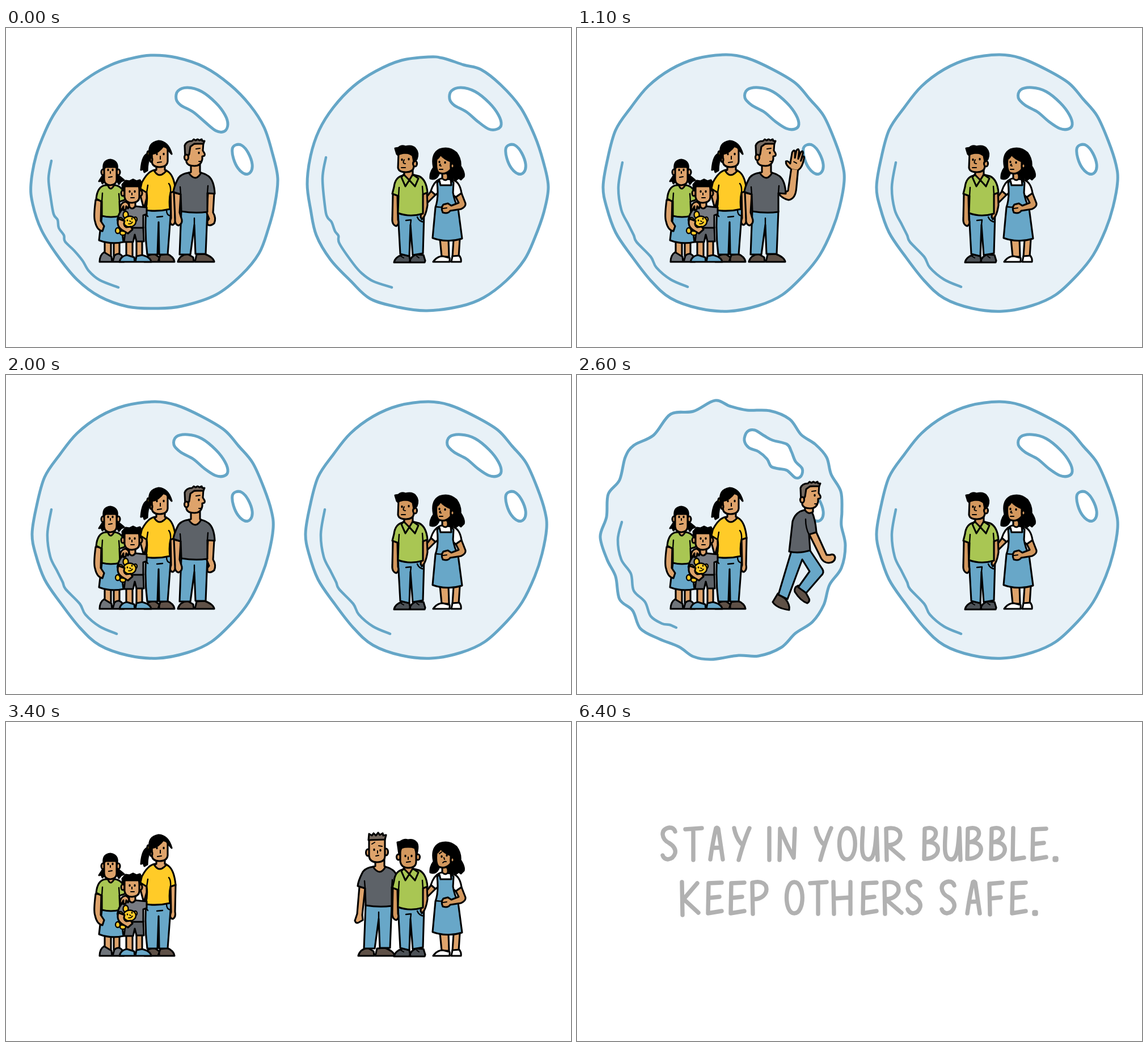
An HTML page for the animation above (6.9 s loop, 996x562 px).

```html
<!DOCTYPE html>
<html lang="en">
<head>
<meta charset="utf-8">
<title>Stay in your bubble</title>
<style>
html, body { margin: 0; width: 100%; height: 100%; overflow: hidden; background: #fff; }
svg { display: block; width: 100%; height: 100%; }
text { font: 62px "Open Sans", sans-serif; fill: transparent; }
</style>
</head>
<body>
<svg id="stage" viewBox="0 0 996 562"></svg>
<script>
const NS = 'http://www.w3.org/2000/svg';
const stage = document.getElementById('stage');

function add(parent, tag, attrs) {
  const e = document.createElementNS(NS, tag);
  for (const k in attrs) e.setAttribute(k, attrs[k]);
  parent.appendChild(e);
  return e;
}
const group = (parent, attrs) => add(parent, 'g', attrs || {});
const show = (e, on) => e.setAttribute('display', on ? 'inline' : 'none');
const shape = (g, fill, d) => add(g, 'path', { d, fill });
const line = (g, d, w) => add(g, 'path', { d, fill: 'none', 'stroke-width': w || 2.4 });
const dots = (g, list, r) => list.forEach(([cx, cy]) =>
  add(g, 'ellipse', { cx, cy, rx: r || 1.7, ry: (r || 1.7) * 1.35, fill: INK, stroke: 'none' }));
const oval = (g, fill, cx, cy, rx, ry) => add(g, 'ellipse', { cx, cy, rx, ry, fill });

const INK = '#000', SKIN = '#dea36b', TAN = '#d3985e', GREEN = '#a9c653', BLUE = '#68a7c8',
  YELLOW = '#ffcb28', GREY = '#5d6268', BROWN = '#5f5147', RIM = '#65a6c7', FILM = '#e8f1f7';

// Smooth curve through a few points
function curve(text, closed) {
  const n = text.trim().split(/\s+/).map(p => p.split(',').map(Number)), len = n.length;
  const at = i => closed ? n[(i + len) % len] : n[Math.max(0, Math.min(len - 1, i))];
  let d = 'M' + n[0];
  for (let i = 0; i < (closed ? len : len - 1); i++) {
    const [a, b, c, e] = [at(i - 1), at(i), at(i + 1), at(i + 2)];
    d += `C${b[0] + (c[0] - a[0]) / 6} ${b[1] + (c[1] - a[1]) / 6} ` +
      `${c[0] - (e[0] - b[0]) / 6} ${c[1] - (e[1] - b[1]) / 6} ${c[0]} ${c[1]}`;
  }
  return d + (closed ? 'Z' : '');
}

const GLARE = '300,125 303,111 320,105 345,112 370,132 386,153 391,170 385,182 370,181 350,165 330,148 308,136';
const GLINT = '399,213 405,206 416,207 427,220 434,240 431,254 421,257 409,247 401,230';
const FILMS = [
  { rim: '255,48 300,52 350,69 395,100 430,136 455,175 470,222 479,265 474,310 462,355 446,397 415,435 370,470 310,490 265,494 215,491 165,473 125,443 90,400 62,355 47,310 44,275 53,225 70,180 87,148 115,112 150,84 185,65 215,55',
    glare: GLARE, glint: GLINT,
    shine: '80,234 75,265 79,300 84,328 91,338 93,352 102,365 104,376 120,392 135,410 146,428 165,444 198,457' },
  { rim: '262,51 288,53 325,65 355,73 390,100 425,140 450,190 465,235 474,280 466,325 450,370 432,408 400,445 360,475 320,490 260,498 210,492 160,477 125,445 90,408 65,365 55,320 49,275 55,225 70,180 95,140 130,103 170,76 215,57',
    glare: GLARE.replace('385,182 370,181', '384,178 369,178'), glint: GLINT,
    shine: '82,228 76,265 81,320 85,334 92,342 98,358 104,366 106,380 130,415 145,432 165,446 198,457' },
  { rim: '262,47 300,53 345,73 385,97 410,125 435,155 455,200 468,240 471,270 463,315 450,355 428,400 400,435 362,470 320,489 268,499 215,494 165,476 130,445 95,400 68,360 52,315 46,280 53,235 68,180 95,140 125,103 165,73 210,54',
    glare: GLARE.replace('300,125 303,111', '296,123 300,109').replace('385,182 370,181', '384,178 369,177'), glint: GLINT,
    shine: '80,237 73,280 78,320 90,345 100,365 105,377 130,403 140,422 165,443 195,456' },
  { rim: '243,45 270,55 300,62 340,63 375,78 395,105 420,122 440,145 448,175 465,205 467,240 466,265 473,300 466,340 445,370 435,405 415,435 385,455 360,480 320,495 285,494 237,501 205,496 180,479 145,465 112,447 98,415 75,395 68,355 53,325 41,285 52,250 55,210 75,185 85,145 100,124 135,106 165,69 205,64',
    glare: '295,115 300,100 313,97 330,107 345,115 370,122 378,135 385,152 397,165 395,178 385,181 370,168 355,165 342,161 335,148 320,135 303,128',
    glint: GLINT,
    shine: '79,259 72,290 78,325 95,350 100,380 120,400 130,425 150,438 163,440 175,445' }
];

function makeBubble(x) {
  const g = group(stage, { transform: `translate(${x})`, stroke: RIM, 'stroke-width': 5,
    'stroke-linecap': 'round', 'stroke-linejoin': 'round' });
  const films = FILMS.map(f => {
    const b = group(g);
    shape(b, FILM, curve(f.rim, true));
    shape(b, '#fff', curve(f.glare, true));
    shape(b, '#fff', curve(f.glint, true));
    line(b, curve(f.shine), 4.5);
    return b;
  });
  const spray = [0, 1].map(s => {
    let d = '';
    for (let i = 0; i < 22; i++) {
      const a = i / 22 * 2 * Math.PI + .1 * Math.sin(i * 7);
      const r = 232 + 16 * s + 10 * Math.sin(i * 5), q = r + 20 - 6 * s;
      const c = Math.cos(a), v = Math.sin(a);
      d += `M${259 + r * c} ${276 + r * v}L${259 + q * c} ${276 + q * v}`;
    }
    return line(g, d, 4.5);
  });
  // film: 0-3 whole, 4-5 burst, -1 gone
  return film => [...films, ...spray].forEach((e, i) => show(e, i === film));
}

const bubbles = [makeBubble(0), makeBubble(482)];
const cast = group(stage, { stroke: INK, 'stroke-width': 3.1, 'stroke-linejoin': 'round', 'stroke-linecap': 'round' });

function girl(g) {
  shape(g, SKIN, 'M174 376V402H185V376ZM190 376V402H200V376Z');
  shape(g, '#70757b', 'M165 412Q165 400 173 395L186 403L187 412ZM188 412L191 401Q200 393 207 405L208 412Z');
  shape(g, BLUE, 'M169 331L164 374Q185 382 207 377L201 331Z');
  shape(g, SKIN, 'M158 303Q154 333 157 341Q160 356 170 358L173 349L167 340L168 303Z');
  shape(g, GREEN, 'M175 277Q161 279 159 301L169 306V331Q185 335 201 331L200 306L212 302Q208 280 193 277Z');
  line(g, 'M169 306L170 291M200 306L199 292');
  shape(g, SKIN, 'M180 272V278Q184 288 190 278V272');
  shape(g, INK, 'M171 259L164 270L168 269L170 274L176 267ZM197 259L208 268L203 270L199 275L195 267Z');
  oval(g, SKIN, 171, 254, 3, 5);
  oval(g, SKIN, 198, 254, 3, 5);
  shape(g, SKIN, 'M173 245V267Q174 277 184 277Q195 276 195 267V245Z');
  shape(g, INK, 'M172 249Q170 233 184 232Q198 234 196 249L193 243L187 244L184 242L176 244Z');
  dots(g, [[180, 250], [188, 250]]);
  line(g, 'M181 263L187 262M184 253V256', 2);
}

function boy(g) {
  shape(g, SKIN, 'M212 375V403H223V375ZM230 375V403H240V375Z');
  shape(g, BLUE, 'M200 412Q202 402 213 400L226 404L227 412ZM228 412L230 402L240 400Q255 404 256 412Z');
  shape(g, GREY, 'M211 351L208 377H224L227 364L230 376H243L242 351Z');
  shape(g, '#777b82', 'M214 315Q201 318 197 335L210 340L211 352H242V330L248 328V316Q236 315 228 314Z');
  shape(g, SKIN, 'M217 305V314Q222 322 228 314V305');
  oval(g, SKIN, 206, 291, 3, 5);
  oval(g, SKIN, 237, 291, 3, 5);
  shape(g, SKIN, 'M209 279V298Q211 308 222 308Q235 307 235 298V279Z');
  shape(g, INK, 'M206 286L205 276L211 269L218 270L224 267L230 270L236 268L239 274L236 287L234 278H210Z');
  dots(g, [[218, 288], [227, 288]]);
  line(g, 'M220 299H226M222 291V294', 2);
}

function bear(g) {
  const b = group(g, { 'stroke-width': 2.3 });
  oval(b, YELLOW, 201, 338, 5, 4);
  oval(b, YELLOW, 197, 357, 4, 5);
  oval(b, YELLOW, 206, 361, 5, 4);
  oval(b, YELLOW, 207, 348, 9, 10);
  oval(b, YELLOW, 211, 329, 4.5, 6);
  oval(b, YELLOW, 228, 337, 3, 4);
  oval(b, YELLOW, 218, 341, 11, 9.5);
  dots(b, [[214, 339], [222, 336]], 1.3);
  line(b, 'M216 345Q220 346 223 342M218 340L220 341', 1.8);
  shape(g, SKIN, 'M198 336Q194 349 205 356L215 362L223 355L220 350L212 351Q206 348 209 340Z');
}

function mother(g) {
  shape(g, SKIN, 'M240 275L236 292L243 318L248 300V288Z');
  shape(g, BROWN, 'M244 412Q246 399 262 398L270 404V412ZM268 412L272 400L284 398Q296 403 297 412Z');
  shape(g, BLUE, 'M247 319Q244 360 249 399H267L269 342L270 399H285L291 319Z');
  line(g, 'M266 333L276 332M250 332L247 328M283 321Q283 330 290 331');
  shape(g, SKIN, 'M290 286L291 335Q287 346 294 347Q300 344 298 334L299 287Z');
  shape(g, YELLOW, 'M262 250Q247 253 235 282L248 290Q250 305 246 321Q268 324 289 319Q287 302 290 290L299 287Q296 256 282 251Z');
  line(g, 'M248 290L250 277M290 290Q291 279 287 274');
  shape(g, SKIN, 'M265 243V250Q262 252 261 251Q270 267 283 251L280 250V243');
  shape(g, INK, 'M251 221Q240 223 238 250L242 248L244 254L249 251Q249 237 254 226Z');
  oval(g, YELLOW, 251, 221, 2, 4);
  shape(g, SKIN, 'M257 218V235Q258 245 270 245Q284 245 285 235V211L270 206Z');
  oval(g, SKIN, 256, 232, 2, 4);
  shape(g, INK, 'M253 223Q250 202 269 199Q286 200 292 222L286 215Q282 208 278 207Q268 221 257 222V228Z');
  dots(g, [[266, 222], [278, 222]]);
  line(g, 'M267 237L274 236M272 226V231', 2);
}

function motherHand(g) {
  shape(g, SKIN, 'M211 306Q202 307 201 318L204 320L207 314V321L211 320L212 314L215 318Q220 311 211 306Z');
}

const HEAD = g => {
  shape(g, SKIN, 'M318 206V236Q320 243 332 243Q344 243 346 231V226Q352 226 350 221L347 216L348 202Z');
  shape(g, '#75695f', 'M316 231L315 207Q318 199 328 199L331 196L334 198L338 196L341 198L345 196L346 199L350 199L348 204L332 204L325 209L323 222L319 230Z');
  oval(g, SKIN, 318, 228, 3.5, 5);
  dots(g, [[340, 220]]);
  line(g, 'M335 213L342 212M340 235H345', 2);
};
const TORSO = 'M322 255Q306 257 302 268Q296 280 295 289L308 293L309 323Q333 327 355 324V291L368 292Q367 269 357 261Q350 256 343 255Z';

function manLegs(g) {
  shape(g, BLUE, 'M309 322L306 399H325L332 347L334 398H352L355 322Z');
  line(g, 'M332 347V335');
}
function manShoes(g) {
  shape(g, BROWN, 'M303 412Q306 400 320 398L330 404L331 412ZM333 412L336 399L350 398Q366 404 367 412Z');
}
function manTorso(g) {
  shape(g, GREY, TORSO);
  line(g, 'M308 293L307 280M355 291L356 278');
  shape(g, SKIN, 'M326 240V254L322 255Q334 273 344 255L342 254V240');
}
const HAND = 'M371 248Q361 243 361 236Q364 234 369 239L370 219Q373 212 375 218L376 228L377 215Q380 209 382 216V229L385 217Q389 212 389 219L387 232L389 224Q393 222 392 228Q391 243 385 248';

function standingMan(g) {
  manShoes(g);
  manLegs(g);
  shape(g, SKIN, 'M296 290L298 335Q297 346 304 348Q311 345 310 338L306 325L308 293Z');
  const down = shape(g, SKIN, 'M367 291L365 325Q371 335 367 344Q360 350 355 346V340L358 336L354 326L356 291Z');
  const up = group(g);
  shape(up, SKIN, 'M356 283Q364 294 371 287L372 247L384 247L385 280Q386 300 374 303Q363 302 355 294Z');
  shape(up, SKIN, HAND);
  line(up, 'M375 235L380 237', 2);
  manTorso(g);
  HEAD(g);
  return { down, up };
}

function walkingMan(g) {
  const legs = [group(g), group(g)];
  shape(legs[0], BROWN, 'M354 385L345 400Q352 411 374 414Q376 405 367 394ZM390 371Q382 374 384 382Q394 398 406 402Q412 398 408 392L403 383Z');
  shape(legs[0], BLUE, 'M410 308L432 341Q437 348 430 354L404 384L390 374L410 346L397 325L371 395L355 387L378 310Z');
  shape(legs[1], BROWN, 'M346 358Q337 361 338 369L344 383L354 379L357 367ZM398 402L400 412H428Q428 405 413 400Z');
  shape(legs[1], BLUE, 'M410 308Q415 350 412 402H397L394 345L382 371L356 370L352 357L374 352L378 310Z');
  shape(g, SKIN, 'M407 276L428 318Q433 331 444 331Q455 330 455 321Q453 314 446 317L440 317L421 275Z');
  shape(g, GREY, 'M401 238Q385 241 380 258L374 311Q391 315 411 309L409 281L422 277Q420 253 414 241Z');
  line(g, 'M403 254Q403 270 409 281');
  shape(g, SKIN, 'M402 230V238Q408 247 416 241V232');
  HEAD(group(g, { transform: 'translate(79,-8)' }));
  return legs;
}

function visitor(g) {
  manShoes(group(g, { transform: 'translate(318)' }));
  const b = group(g, { transform: 'translate(325)' });
  manLegs(b);
  shape(b, SKIN, 'M298 290L294 338L290 350Q292 356 297 353L304 349L303 340L308 293Z');
  manTorso(b);
  oval(g, SKIN, 638, 230, 3.5, 6);
  oval(g, SKIN, 670, 229, 3.5, 6);
  shape(g, SKIN, 'M640 203V236Q641 247 654 247Q668 247 668 236V203Z');
  shape(g, '#75695f', 'M639 208L640 197L645 200L648 196L652 200L656 195L659 199L664 196L665 200L670 199L668 207Z');
  dots(g, [[649, 225], [660, 226]]);
  line(g, 'M645 215L650 212M657 218L663 219M652 236L657 235M655 227V231', 2);
}

function woman(g) {
  shape(g, SKIN, 'M765 372L768 403H781L780 373ZM789 373L787 403H798L800 372Z');
  shape(g, '#fff', 'M753 412Q760 402 770 402L782 405V412ZM785 412L787 402L799 401Q803 406 802 412Z');
  shape(g, TAN, 'M752 284L742 297L743 308L759 292Z');
  shape(g, '#fff', 'M768 265Q755 268 749 287L757 294L765 288L785 292L793 298L803 291Q800 270 786 267Z');
  shape(g, BLUE, 'M764 269L766 277H785L784 268L789 272L788 290Q790 303 797 318L804 371Q778 379 752 370L757 316Q763 300 760 272Z');
  line(g, 'M757 315Q775 317 793 313');
  shape(g, TAN, 'M803 291L810 309Q811 315 802 319L783 322Q779 328 770 325Q766 317 771 311L779 309L785 313L798 308L793 298Z');
  line(g, 'M770 318L777 317', 2);
  shape(g, TAN, 'M769 254V265Q775 271 779 265V254');
  shape(g, INK, 'M748 265Q747 255 754 246Q749 222 764 214Q781 208 794 220Q802 231 801 243Q809 255 807 262L802 267L798 264L793 268L789 264L783 266L777 256L764 254Q760 269 748 265Z');
  shape(g, TAN, 'M759 231Q757 250 763 255Q775 260 784 249V235Q773 231 766 223Q762 230 759 231Z');
  oval(g, TAN, 787, 243, 3, 4);
  const calm = group(g), sad = group(g);
  dots(calm, [[764, 236], [774, 237]]);
  line(calm, 'M766 240Q762 242 767 243M764 249H770', 2);
  dots(sad, [[768, 237], [777, 235]]);
  line(sad, 'M764 232L768 229M774 229L779 231M772 239L773 242M770 248Q772 245 776 246', 2);
  return [calm, sad];
}

function neighbour(g) {
  shape(g, '#4d5257', 'M684 413Q686 403 700 399L711 402L713 413ZM711 413Q713 402 724 399L736 400L739 410L738 413Z');
  line(g, 'M696 402L701 405M724 402L728 405', 2);
  shape(g, BLUE, 'M691 326L695 398L711 402L713 347L717 400L735 397L737 326Z');
  line(g, 'M713 347L714 338L705 339M725 333Q728 341 737 342');
  const down = shape(g, TAN, 'M682 292L681 335Q680 347 688 349Q694 345 691 338L690 295Z');
  shape(g, TAN, 'M742 288L743 312Q740 332 733 337L731 333L735 292Z');
  const up = group(g);
  shape(up, TAN, 'M658 278Q665 302 692 317L692 294Q676 290 668 277Z');
  add(up, 'path', { d: HAND, fill: TAN, transform: 'translate(968,75) scale(-.82,.83)', 'stroke-width': 3.6 });
  shape(g, GREEN, 'M699 260Q686 263 684 280L681 292L692 296L691 326Q712 334 735 327V293L743 290Q741 267 728 261L716 258Z');
  line(g, 'M692 296L693 281M735 293L734 279');
  shape(g, TAN, 'M702 248V261L711 269L717 261V248');
  shape(g, GREEN, 'M701 258L697 263L704 279L711 268ZM717 258L711 268L721 279L727 265Z');
  const side = group(g), front = group(g);
  shape(side, TAN, 'M692 220L691 246Q692 254 705 254Q718 254 719 244L721 220Z');
  oval(side, TAN, 721, 239, 3.5, 5);
  shape(side, INK, 'M689 222L686 212L692 211Q697 206 704 209Q717 206 722 213Q728 220 724 231L719 236L717 225Q711 219 701 220Q692 222 691 224Z');
  dots(side, [[698, 232], [710, 231]]);
  line(side, 'M702 232Q698 239 704 239M697 246H704', 2);
  oval(front, TAN, 692, 238, 3.5, 5);
  oval(front, TAN, 726, 238, 3.5, 5);
  shape(front, TAN, 'M695 220V246Q697 257 709 257Q723 257 723 246V220Z');
  shape(front, INK, 'M693 233L690 212L695 211Q702 206 708 208Q718 206 723 212Q728 216 724 233L721 222Q709 217 697 222Z');
  dots(front, [[704, 236], [715, 236]]);
  line(front, 'M706 247L713 246M709 238V242', 2);
  return { down, up, faces: [side, front] };
}

mother(group(cast));
girl(group(cast));
boy(group(cast));
bear(cast);
motherHand(cast);
const standing = group(cast), stander = standingMan(standing);
const herFaces = woman(group(cast));
const arrived = group(cast);
visitor(arrived);
const walking = group(cast), strides = walkingMan(walking);
const him = neighbour(group(cast));

const GLYPHS = {
  S: 'M26 10Q24 3 16 3Q4 5 4 15Q5 25 15 30Q28 38 26 48Q23 58 13 59Q6 58 4 52',
  T: 'M3 6L32 4M17 6V60',
  A: 'M4 59Q8 30 14 4Q16 2 18 5L26 59M7 39L23 38',
  Y: 'M4 4Q7 20 16 31M31 4Q22 24 12 60',
  I: 'M4 4V60',
  N: 'M4 60L5 5Q15 30 29 56L31 5',
  O: 'M17 4C-1 4 -1 59 17 59C36 59 36 4 17 4Z',
  U: 'M5 4C4 30 -1 59 15 59C26 59 28 30 29 4L31 60',
  R: 'M6 60L5 5C38 -3 38 34 7 34L35 58',
  B: 'M6 58L7 5C33 -3 33 26 8 29C39 25 37 59 6 58',
  L: 'M6 4L5 59L25 56',
  E: 'M29 5L6 6L5 59L29 55M6 32L25 30',
  K: 'M5 4L6 62M32 6L8 34L34 58',
  P: 'M7 60L6 5C40 -4 38 35 8 34',
  H: 'M5 4L6 60M35 4V60M6 33L35 31',
  F: 'M28 5L5 7L6 61M6 33L25 31',
  '.': 'M4 57h3v3h-3z'
};
const lettering = group(stage, { 'stroke-width': 7.4, 'stroke-linecap': 'round', 'stroke-linejoin': 'round', fill: 'none' });
function write(words, y, xs) {
  words.replace(/ /g, '').split('').forEach((c, i) =>
    add(lettering, 'path', { d: GLYPHS[c], transform: `translate(${xs[i]},${y})` }));
  // selectable layer over the drawn letters
  add(lettering, 'text', { x: xs[0], y: y + 60, stroke: 'none' }).textContent = words;
}
write('STAY IN YOUR BUBBLE.', 183, [147, 188, 231, 273, 335, 353, 417, 459, 499, 540, 606, 645, 682, 724, 763, 798, 838]);
write('KEEP OTHERS SAFE.', 278, [180, 226, 266, 303, 366, 408, 447, 499, 537, 579, 639, 684, 722, 762, 802]);

const LOOP = 6900, STEP = 100;
const LEAVE = 24, ARRIVE = 34;

function filmAt(k, order, touch, burst) {
  if (k >= burst + 2) return -1;
  if (k >= burst) return 4 + k - burst;
  return k >= touch ? 3 : order[k % 3];
}

function wave(arm, on, swing) {
  show(arm.down, !on);
  show(arm.up, on);
  arm.up.setAttribute('transform', swing);
}

function draw(t) {
  const worded = t >= 4400;
  show(cast, !worded);
  show(lettering, worded);
  lettering.setAttribute('stroke', t < 6400 ? INK : '#b1b1b1');
  const k = Math.min(ARRIVE, Math.floor(t / STEP));
  bubbles[0](filmAt(k, [0, 1, 2], 25, 27));
  bubbles[1](filmAt(k, [1, 0, 2], 29, 30));
  if (worded) return;

  wave(him, k >= 4 && k <= 10, `rotate(${k % 2 ? 0 : -7} 690 305)`);
  wave(stander, k >= 11 && k <= 17, `rotate(${k % 2 ? 7 : 0} 374 295)`);
  show(standing, k < LEAVE);
  show(walking, k >= LEAVE && k < ARRIVE);
  show(arrived, k >= ARRIVE);
  walking.setAttribute('transform', `translate(${(k - 26) * 31})`);
  const stride = (k >> 1) % 2 ? 0 : 1;
  strides.forEach((e, i) => show(e, i === stride));
  const worried = k >= 31 ? 1 : 0;
  herFaces.forEach((e, i) => show(e, i === worried));
  him.faces.forEach((e, i) => show(e, i === worried));
}

let start;
function tick(now) {
  if (start === undefined) start = now;
  draw((now - start) % LOOP);
  requestAnimationFrame(tick);
}
draw(0);
requestAnimationFrame(tick);
</script>
</body>
</html>
```
